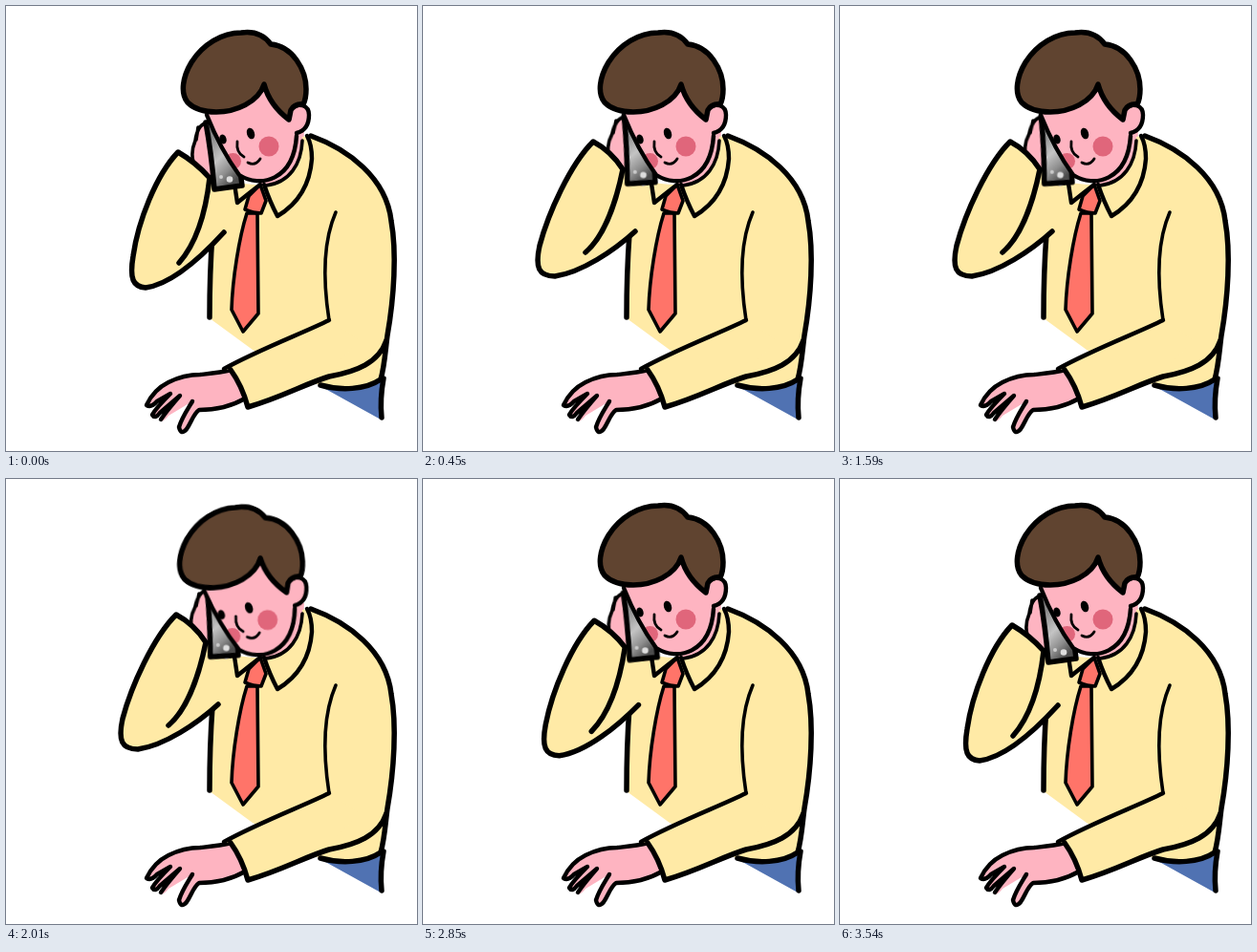
Write an HTML page that moves like this. It is 430x466 px and loops after 3570 ms.

```html
<!DOCTYPE html>
<html lang="en">
<head>
<meta charset="utf-8">
<title>Man on the phone</title>
<style>
  html, body { margin: 0; width: 100%; height: 100%; overflow: hidden; background: #fff; }
  svg { display: block; width: 430px; height: 466px; }
  .ink { fill: none; stroke: #000; stroke-width: 5.5; stroke-linecap: round; stroke-linejoin: round; }
  .mid { stroke-width: 4.4; }
  .thin { stroke-width: 3.6; }
  .fine { stroke-width: 2.8; }
  .shirt { fill: #ffeaa6; }
  .skin { fill: #feb4c1; }
  .hair { fill: #604430; }
  .tie { fill: #ff7469; }
  .jeans { fill: #5072b2; }
  .cheek { fill: #e0667b; }
  .metal { fill: url(#metal); }
</style>
</head>
<body>
<svg viewBox="0 0 430 466">
  <defs>
    <linearGradient id="metal" x1="0.1" y1="0.15" x2="0.55" y2="1">
      <stop offset="0" stop-color="#777"/>
      <stop offset="0.5" stop-color="#c4c4c4"/>
      <stop offset="0.78" stop-color="#8c8c8c"/>
      <stop offset="1" stop-color="#4c4c4c"/>
    </linearGradient>
    <clipPath id="face">
      <path d="M209 112L230 155L246 178L268 184L304 160L304 80L209 80Z"/>
    </clipPath>
  </defs>

  <g id="rest">
    <path class="skin" d="M240 380C224 384 212 385 203 386C190 386 178 390 170 394C160 399 152 407 147 418Q152 422 158 415L172 406L153 428Q156 433 161 427L183 408L162 434Q165 436 170 429L195 414L181 441Q183 450 189 443C194 436 196 427 202 423C220 423 238 418 250 411Z"/>
    <path class="ink mid" d="M236 381C224 384 212 385 203 386C190 386 178 390 170 394C160 399 152 407 147 418Q152 421 158 414L172 406C164 414 157 421 153 428Q156 433 161 426L182 408C175 416 168 424 162 433M195 414C189 424 184 431 181 441Q183 450 189 443C194 436 196 427 202 423C220 423 238 418 250 411"/>
  </g>

  <g id="body">
    <path class="jeans" d="M327 397L392 433L393 390Z"/>
    <path class="shirt" d="M213 327L216 238L222 192L240 185L268 188L314 136C358 150 398 180 403 225C409 258 406 305 399 345C397 360 396 378 392 391C376 402 350 403 328 397L258 360Z"/>
    <path class="ink" d="M216 238Q213 280 213 326"/>
    <path class="ink" d="M319 136C358 150 398 180 403 225C409 258 406 305 399 345C397 360 396 378 392 391C376 402 350 403 329 397M395 390Q391 412 393 431"/>
    <path class="ink thin" d="M345 216C331 248 332 290 338 329"/>
    <path class="shirt" d="M338 329C312 342 264 360 229 381L235 381L253 420L330 391L370 350Z"/>
    <path class="ink mid" d="M338 329C312 342 264 360 228 380"/>
    <path class="ink" d="M235 381C243 392 249 405 253 420C288 410 312 396 338 388C366 383 390 374 398 350"/>
  </g>

  <g id="collar">
    <path class="skin" d="M244 172L268 187L284 188L310 166L312 130L280 130Z"/>
    <path class="ink thin" d="M252 217C244 242 237 285 236 318L248 341L264 322L263 217Z" style="fill:#ff7469"/>
    <path class="ink thin" d="M266 187L254 199L250 213Q259 217 267 217L272 204Z" style="fill:#ff7469"/>
    <path class="shirt" d="M240 188L242 206L266 187Z"/>
    <path class="ink mid" d="M239 186L242 206Q253 197 266 187"/>
    <path class="shirt" d="M270 186L284 220C304 208 318 188 320 160Q320 145 315 136L310 137C310 165 300 184 276 187Z"/>
    <path class="ink mid" d="M270 187Q276 205 284 220C304 208 318 188 320 160Q320 145 315 136"/>
    <path class="ink thin" d="M272 188C297 185 309 165 310 141"/>
  </g>

  <g class="held">
    <path class="skin" d="M209 122Q200 125 197 142Q193 154 195 164L214 182L220 160Z"/>
    <path class="ink thin" d="M208 123Q200 126 198 141Q193 153 196 163M201 127Q200 134 199 140"/>
  </g>
  <path id="sleeve" class="shirt"/>
  <path id="seams" class="ink"/>
  <g class="held">
    <path class="ink metal" d="M209 122Q215 155 218 192L247 188L238 120Z"/>
    <circle cx="234" cy="181.500" r="3.300" fill="#ddd"/>
    <circle cx="225" cy="179" r="2" fill="#ccc"/>
  </g>

  <g id="head">
    <path class="skin" d="M207 108C218 134 230 158 246 178C266 188 290 180 304 158L304 133C318 130 322 106 308 103L290 80L268 76Z"/>
    <g clip-path="url(#face)">
      <circle class="cheek" cx="237.500" cy="162.500" r="8.500"/>
    </g>
    <circle class="cheek" cx="275" cy="147" r="10.500"/>
    <path class="ink mid" d="M210 114C218 134 230 158 244 177C266 191 301 183 304 136"/>
    <path class="ink mid" d="M298 108C306 100 317 104 317 114C317 125 312 131 304 133"/>
    <path class="hair ink" style="fill:#604430" d="M190 101C182 91 185 74 194 59C206 40 226 28 246 28Q266 25 277 40C300 42 314 67 314 87Q314 97 311 103Q302 102 298 109L296 119C284 110 274 97 270 82C264 101 240 111 220 111Q200 111 190 101Z"/>
    <ellipse cx="227" cy="139.500" rx="3.600" ry="5" transform="rotate(-18 227 139.500)"/>
    <ellipse cx="256" cy="133.500" rx="4" ry="6" transform="rotate(-18 256 133.500)"/>
    <path class="ink fine" d="M242 142C241 150 243 155 249 158"/>
    <path class="ink fine" d="M253 164Q261 168 266 160"/>
  </g>
</svg>
<script>
  const LOOP = 3570;
  const EASE = 'cubic-bezier(.42, 0, .58, 1)';

  // Cuff, outer edge, elbow, underside and crease of the raised arm.
  const low = [213,180, 199,164, 180,153, 157,177, 138,226, 133,262, 129,286, 133,294, 146,295, 175,291, 207,260, 228,237, 210,207, 203,244, 181,269];
  const high = [209,171, 197,152, 178,142, 154,166, 131,217, 122,251, 117,274, 121,283, 138,283, 166,279, 200,256, 222,236, 203,201, 191,240, 170,258];

  function armPaths(n) {
    const p = (a, b) => n.slice(a * 2, b * 2).join(' ');
    const edge = `M${p(0, 1)} Q${p(1, 3)} C${p(3, 6)} C${p(6, 9)} C${p(9, 12)}`;
    return {
      fill: `path("${edge} L236 194 Z")`,
      ink: `path("${edge} M${p(0, 1)} C${p(12, 15)}")`
    };
  }

  function play(el, prop, steps) {
    const frames = steps.map(([time, value]) => ({ offset: time / LOOP, [prop]: value, easing: EASE }));
    el.animate(frames, { duration: LOOP, iterations: Infinity });
  }

  const get = id => document.getElementById(id);
  const arm = (down, up) => [[0, down], [390, up], [2640, up], [3030, down], [LOOP, down]];
  const turn = deg => `rotate(${deg}deg)`;

  const a = armPaths(low), b = armPaths(high);
  play(get('sleeve'), 'd', arm(a.fill, b.fill));
  play(get('seams'), 'd', arm(a.ink, b.ink));

  for (const el of document.querySelectorAll('.held')) {
    el.style.transformOrigin = '288px 136px';
    play(el, 'transform', arm(turn(0), turn(4.6)));
  }

  const head = get('head');
  head.style.transformOrigin = '290px 180px';
  play(head, 'transform', [
    [0, turn(0)], [480, turn(0)], [780, turn(-2.5)], [1080, turn(0)],
    [1650, turn(0)], [1950, turn(-2.5)], [2250, turn(0)], [LOOP, turn(0)]
  ]);
</script>
</body>
</html>
```
